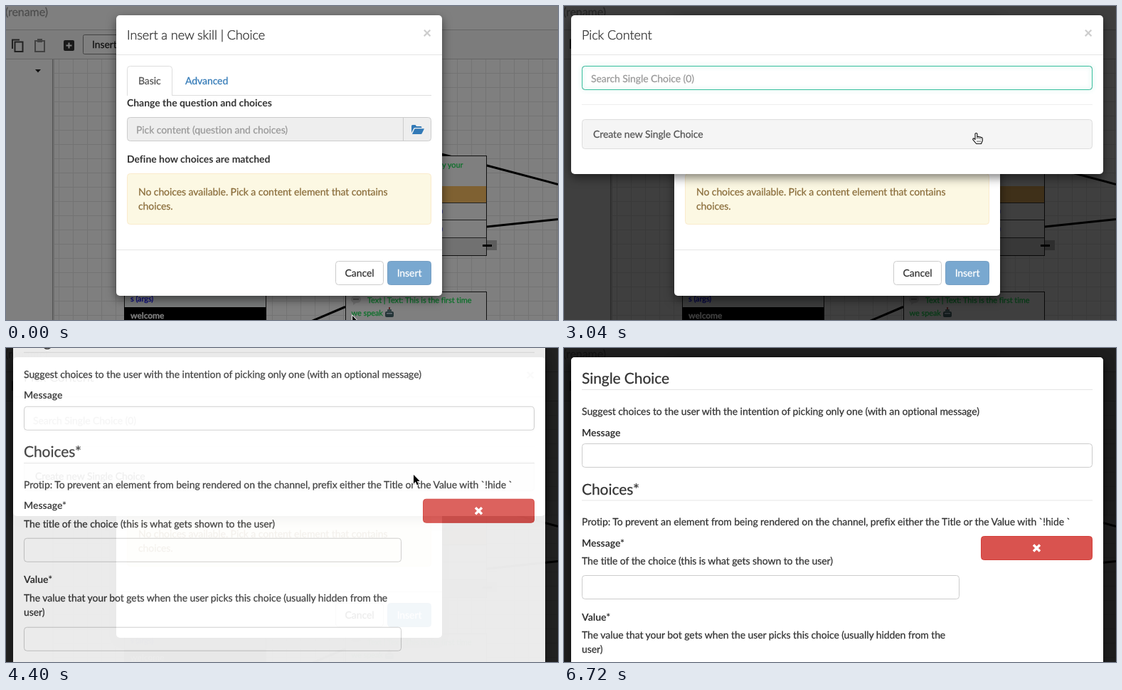
An HTML page for the animation above (7280 ms loop, 776 px wide and 441 px high).

```html
<!DOCTYPE html>
<html lang="en">
<head>
<meta charset="utf-8">
<title>Insert a choice skill</title>
<style>
html, body { margin: 0; width: 100%; height: 100%; overflow: hidden; background: #808080; }
svg { display: block; width: 776px; height: 441px; font: 14px Lato, sans-serif; letter-spacing: -.075px; text-rendering: geometricPrecision; }
.shadow { filter: drop-shadow(0 5px 7px rgba(0,0,0,.5)); }
</style>
</head>
<body>
<svg id="stage" viewBox="0 0 776 441" xmlns="http://www.w3.org/2000/svg"></svg>
<script>
const LOOP = 7280, STEP = 80;

// Markup helpers
const attrs = o => Object.entries(o).map(([k, v]) => ` ${k}="${v}"`).join('');
const rect = (x, y, w, h, fill, o = {}) => `<rect${attrs({ x, y, width: w, height: h, fill, ...o })}/>`;
const box = (x, y, w, h, fill, stroke, rx = 4, o = {}) =>
  rect(x + .5, y + .5, w - 1, h - 1, fill, { stroke, rx, ...o });
const path = (d, fill, o = {}) => `<path${attrs({ d, fill, ...o })}/>`;
const line = (d, stroke, width = 1) => path(d, 'none', { stroke, 'stroke-width': width });
const rule = (x1, x2, y, c = '#e5e5e5') => rect(x1, y, x2 - x1, 1, c);
// A hairline stroke gives the slightly heavy look of smoothed type
const text = (x, y, s, fill = '#333', o = {}) =>
  `<text${attrs({ x, y, fill, stroke: fill, 'stroke-width': .25, ...o })}>${s}</text>`;
const bold = (x, y, s, fill) =>
  text(x, y, s, fill, { 'font-weight': 700, 'letter-spacing': '-.03px', 'stroke-width': 0 });
const group = (id, s, o = {}) => `<g${attrs({ id, ...o })}>${s}</g>`;
const cover = id => rect(0, 0, 776, 441, '#000', { id, opacity: .5 });
const panel = (x, y, w, h) => rect(x, y, w, h, '#fff', { rx: 5, class: 'shadow' });
const closeX = (x, y) => text(x, y, '×', '#ccc', { 'font-size': 21, 'font-weight': 700, 'text-anchor': 'middle' });
const title = (x, s) => text(x, 47, s, '#333', { 'font-size': 18, 'font-weight': 300, 'stroke-width': .35 });
const legend = (y, s) => text(25, y, s, '#333', { 'font-size': 21 }) + rule(25, 743, y + 8);

function grid() {
  let d = '';
  for (let x = 74.5; x < 776; x += 20) d += `M${x} 75V441`;
  for (let y = 94.5; y < 441; y += 20) d += `M68 ${y}H776`;
  return line(d, '#e8e8e8');
}

function page() {
  const green = '#14e050', small = { 'font-size': 11 };
  return rect(0, 0, 776, 441, '#fff')
    + text(-1, 14, '(rename)', '#999', { 'font-size': 16 })
    + rect(0, 33, 776, 42, '#fafafa') + rule(0, 776, 33, '#ccc') + grid() + rule(0, 776, 74, '#ccc')
    + rect(65, 75, 3, 366, '#ddd') + rect(65, 75, 1, 366, '#aaa')
    + path('M41 89H49L45 93.5Z', '#222')
    // toolbar icons
    + line('M9 60V47.5H19M12.5 50.5H23.5V64H12.5Z', '#444', 2)
    + line('M41 49H54V64H41Z', '#888', 2) + rect(44, 46, 7, 5, '#888')
    + rect(81, 48, 15, 15, '#333', { rx: 2 }) + line('M84.5 55.5H92.5M88.5 51.5V59.5', '#fff', 2)
    + box(108, 40, 70, 28, '#fff', '#888', 2) + text(121, 59, 'Insert', '#222')
    // flow nodes and links
    + line('M600 205L676 224L776 250.5M600 317L676 310L776 299.5', '#000', 3)
    + line('M424 445L477 422.5', '#000', 3)
    + box(477, 210, 199, 141, '#fff', '#222', 0)
    + text(613, 227, 'y your', green, small)
    + rect(478, 253, 197, 23, '#ffc464')
    + rect(478, 325, 197, 25, '#e4e4e4')
    + rule(478, 675, 276, '#444') + rule(478, 675, 300, '#444') + rule(478, 675, 325, '#444')
    + text(611, 292, ')', '#00f', small) + text(611, 317, ')', '#00f', small)
    + rect(676, 329, 14, 14, '#bbb') + rect(670, 335, 13, 3, '#000')
    + box(166, 390, 200, 60, '#f4f8f8', '#222', 0)
    + text(175, 415, 's (args)', '#00f', small)
    + rect(166, 423, 200, 18, '#000') + text(175, 438.5, 'welcome', '#fff', { 'font-size': 12, 'font-weight': 700 })
    + box(477, 401, 199, 50, '#fff', '#222', 0)
    + text(508, 416.5, 'Text | Text: This is the first time', green, small)
    + text(485.5, 435, 'we speak', green, small)
    + path('M485 412Q485 407 492 407T499 412T492 417L488 420V416.5Q485 415 485 412Z', '#ddd')
    + rect(488, 411, 8, 1.5, '#888')
    + rect(533, 429, 12, 8, '#49686e', { rx: 2 }) + rect(536, 426, 6, 4, '#67858a', { rx: 1 })
    + rect(538, 423, 2, 3, '#b55') + rect(535, 431, 8, 1.5, '#cde');
}

function skillDialog() {
  const mid = { 'text-anchor': 'middle' };
  return panel(155, 13, 458, 394)
    + title(170, 'Insert a new skill | Choice') + closeX(592, 45) + rule(155, 613, 68)
    + rule(170, 598, 125, '#ddd')
    + path('M170.5 126V88.5Q170.5 84.5 174.5 84.5H229.5Q233.5 84.5 233.5 88.5V126', '#fff', { stroke: '#ddd' })
    + text(186, 110, 'Basic', '#555') + text(252, 110, 'Advanced', '#337ab7')
    + bold(170, 140.5, 'Change the question and choices')
    + box(170, 156, 428, 34, '#eee', '#ccc') + rect(558, 157, 1, 32, '#ccc')
    + text(183, 179, 'Pick content (question and choices)', '#999')
    + path('M570 178V168.5Q570 167 571.5 167H575.5L577 169H583Q584.5 169 584.5 171H575Q573.5 171 573 172.2ZM571 180L574.2 173Q574.6 172.2 575.6 172.2H588L584.6 179.2Q584.2 180 583.2 180Z', '#337ab7')
    + bold(170, 219.5, 'Define how choices are matched')
    + box(170, 235, 428, 72, '#fcf8e3', '#faebcc')
    + text(186, 266, 'No choices available. Pick a content element that contains', '#8a6d3b')
    + text(186, 286, 'choices.', '#8a6d3b')
    + rule(155, 613, 342)
    + box(463, 358, 68, 34, '#fff', '#ccc') + text(497, 380, 'Cancel', '#333', mid)
    + group('insert', box(536, 358, 62, 34, '#337ab7', '#2e6da4') + text(567, 380, 'Insert', '#fff', mid), { opacity: .65 });
}

function pickDialog() {
  return panel(10, 13, 748, 223)
    + title(25, 'Pick Content') + closeX(737, 45) + rule(10, 758, 68)
    + box(25, 84, 718, 34, '#fff', '#ccc')
    + group('focus', box(25, 84, 718, 34, 'none', '#3abf9f', 4, { style: 'filter:drop-shadow(0 0 3px rgba(26,188,156,.45))' }))
    + text(38, 107, 'Search Single Choice (0)', '#999')
    + rect(38, 93, 1, 17, '#333', { id: 'caret' })
    + rule(25, 743, 138, '#eee')
    + box(25, 159, 718, 42, '#f5f5f5', '#ddd') + text(41, 185, 'Create new Single Choice', '#555');
}

function formDialog() {
  const input = (y, w) => box(25, y, w, 34, '#fff', '#ccc');
  return panel(10, 13, 748, 700)
    + legend(50, 'Single Choice')
    + text(25, 94, 'Suggest choices to the user with the intention of picking only one (with an optional message)')
    + bold(25, 123.5, 'Message') + input(134, 718)
    + legend(205.5, 'Choices*')
    + text(25, 249, 'Protip: To prevent an element from being rendered on the channel, prefix either the Title or the Value with `!hide `')
    + bold(25, 278.5, 'Message*')
    + box(586, 264, 157, 34, '#d9534f', '#d43f3a')
    + line('M660 276.5L669 285.5M669 276.5L660 285.5', '#fff', 3.4)
    + text(25, 304, 'The title of the choice (this is what gets shown to the user)') + input(319, 531)
    + bold(25, 382.5, 'Value*')
    + text(25, 408, 'The value that your bot gets when the user picks this choice (usually hidden from the')
    + text(25, 428, 'user)') + input(444, 531);
}

const arrow = path('M0 0V12.4L2.8 9.8L4.8 14.4L6.9 13.5L4.9 9H8.7Z', '#000',
  { id: 'arrow', stroke: '#fff', 'stroke-width': 1.6, 'paint-order': 'stroke' });
const hand = group('hand',
  path('M-1.5 1.4Q0 -.5 1.4 1.4V6Q2.8 4.6 4 6.2Q5.4 5 6.5 6.6Q8.6 6 8.8 8V11L7 15.5H.2L-4.7 9.6Q-4.6 7.2 -2.8 8.2L-1.5 9.5Z',
    '#fff', { stroke: '#111', 'stroke-width': 1.1, 'stroke-linejoin': 'round' })
  + line('M1.4 6V9M4 6.5V9M6.5 7V9.5M1.5 11V13.5M3.6 11V13.5M5.7 11V13.5', '#333', .8));

// All backdrops lie below all dialogs
document.getElementById('stage').innerHTML = page()
  + cover('dim1') + cover('dim2') + cover('dim3')
  + group('skill', skillDialog())
  + `<circle id="ring" cx="584" cy="185.5" fill="#fff" fill-opacity=".5" stroke="#222" stroke-width="1.2"/>`
  + group('pick', pickDialog())
  + group('form', formDialog())
  + group('cursor', arrow + hand);

const el = id => document.getElementById(id);
const set = (id, k, v) => el(id).setAttribute(k, v);
const show = (id, on) => set(id, 'display', on ? 'inline' : 'none');
const clamp = v => Math.max(0, Math.min(1, v));

// Cursor stops: time, x, y
const stops = [
  [0, 487, 435], [400, 556, 379], [560, 556, 379], [1360, 579.5, 178],
  [3600, 579.5, 178], [3840, 573, 178], [6320, 573, 178], [6640, 412, 396], [LOOP, 412, 396]
];

function cursorAt(t) {
  const i = stops.findIndex(s => s[0] > t), a = stops[i - 1], b = stops[i];
  const p = (t - a[0]) / (b[0] - a[0]), e = p * p * (3 - 2 * p);
  return [a[1] + (b[1] - a[1]) * e, a[2] + (b[2] - a[2]) * e];
}

// Dialog drops in from above while it and its backdrop fade in
function drop(id, dim, t, start, time, rise) {
  const fade = clamp((t - start) / (time * .5));
  const y = -rise * Math.pow(1 - clamp((t - start) / time), 1.85);
  show(id, fade > 0);
  set(id, 'opacity', fade);
  set(id, 'transform', `translate(0 ${y.toFixed(2)})`);
  set(dim, 'opacity', fade * .5);
}

function draw(t) {
  drop('pick', 'dim2', t, 2500, 140, 56);
  drop('form', 'dim3', t, 4267, 293, 160);
  show('ring', t >= 1760 && t < 2560);
  set('ring', 'r', t < 1840 ? 13 : 16.3);
  show('caret', t < 3040 || t >= 3520 && t < 4000);
  set('focus', 'opacity', 1 - clamp((t - 4080) / 320));
  const pointing = t >= 2640 && t < 4160;
  show('arrow', !pointing);
  show('hand', pointing);
  show('cursor', t < 6720);
  set('cursor', 'transform', `translate(${cursorAt(t).map(v => v.toFixed(2)).join(' ')})`);
}

function tick(now) {
  draw(Math.floor(now % LOOP / STEP) * STEP);
  requestAnimationFrame(tick);
}
draw(0);
requestAnimationFrame(tick);
</script>
</body>
</html>
```
